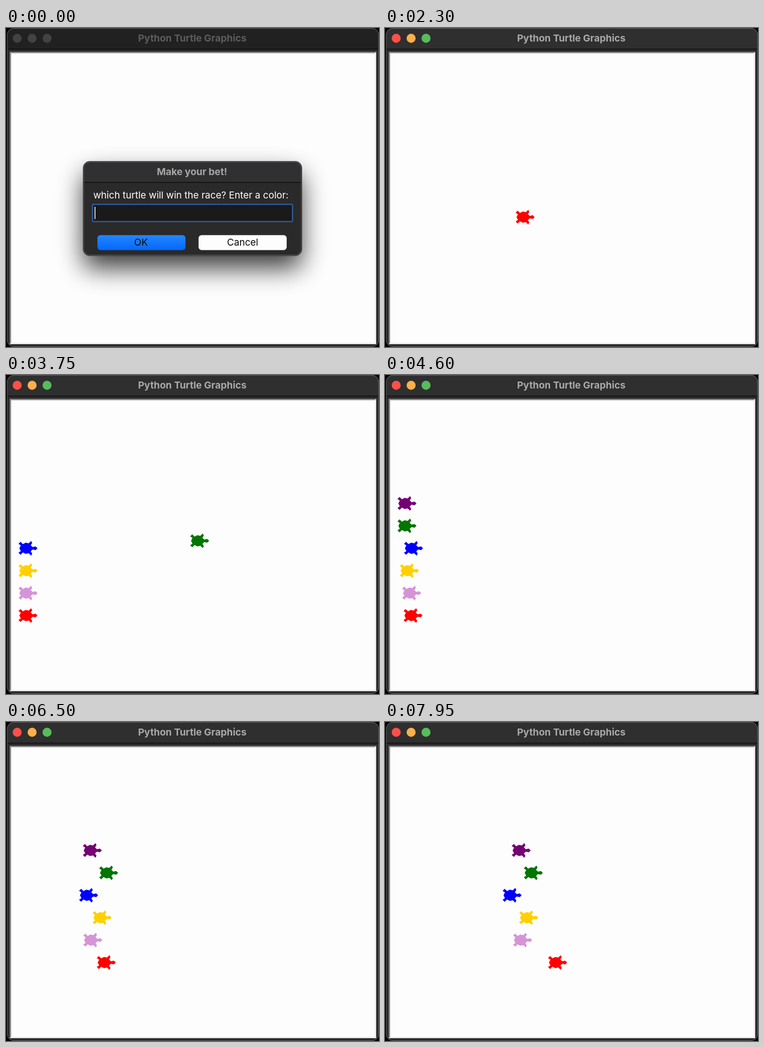
Write an HTML page that moves like this. It is 800 px wide and 683 px high and loops after 8000 ms.

```html
<!DOCTYPE html>
<html lang="en">
<head>
<meta charset="utf-8">
<title>Turtle race</title>
<style>
  html, body { margin: 0; width: 100%; height: 100%; overflow: hidden; background: #000; }
  svg { display: block; width: 100vw; height: 100vh; }
  text { font-family: Inter, "Open Sans", sans-serif; font-size: 20.4px; }
  .title { font-size: 20.7px; font-weight: 700; text-anchor: middle; }
  .mid { text-anchor: middle; }
</style>
</head>
<body>
<svg viewBox="0 0 800 683">
  <defs>
    <filter id="blur" x="-40%" y="-80%" width="180%" height="260%">
      <feGaussianBlur stdDeviation="27"/>
    </filter>
    <linearGradient id="ok" x2="0" y2="1">
      <stop stop-color="#2486ff"/>
      <stop offset="1" stop-color="#0568fb"/>
    </linearGradient>
    <clipPath id="frame"><rect x="2" width="798" height="683" rx="15"/></clipPath>
    <clipPath id="page"><rect x="11" y="54" width="780" height="620"/></clipPath>
  </defs>

  <g clip-path="url(#frame)">
    <rect width="800" height="683" fill="#2b2b2b"/>
    <rect id="bar" width="800" height="45"/>
    <rect y="44.5" width="800" height="1.5" fill="#0c0c0c"/>
  </g>
  <rect x="2.7" y=".7" width="796.6" height="681.6" rx="15" fill="none" stroke="#5c5c5c" stroke-width="1.2"/>
  <g id="lights"></g>
  <text id="heading" class="title" x="399.5" y="28.7">Python Turtle Graphics</text>

  <rect x="8" y="51" width="786" height="626" fill="#ececec"/>
  <path d="M8 677V51H794L791 54H11V674Z" fill="#8c8c8c"/>
  <rect x="11" y="54" width="780" height="620" fill="#fdfdfd"/>
  <g id="field" clip-path="url(#page)"></g>

  <g id="dialog">
    <g clip-path="url(#page)">
      <rect x="166" y="312" width="468" height="202" rx="15" opacity=".76" filter="url(#blur)"/>
    </g>
    <rect x="165" y="285" width="470" height="203" rx="15" fill="#111"/>
    <rect x="166.5" y="286.5" width="467" height="200" rx="14" fill="#2a2a2a"/>
    <path d="M166.5 330V300.5a14 14 0 0 1 14-14H619.5a14 14 0 0 1 14 14V330Z" fill="#303032"/>
    <rect x="166" y="329.8" width="468" height="1.4" fill="#080808"/>
    <rect x="166.5" y="286.5" width="467" height="200" rx="14" fill="none" stroke="#636363" stroke-width="1.3"/>
    <text class="title" x="399" y="314.5" fill="#a6a6a6">Make your bet!</text>
    <text class="mid" x="396.5" y="365" fill="#fff">which turtle will win the race? Enter a color:</text>
    <rect x="185.5" y="377.5" width="429" height="37" rx="2" fill="#1a1a1a" stroke="#2c558d" stroke-width="3"/>
    <text id="entry" x="191" y="403.5" fill="#fff"></text>
    <rect id="caret" y="383" width="1.7" height="26" fill="#fff"/>
    <rect x="196" y="443.5" width="189" height="32" rx="6.5" fill="url(#ok)"/>
    <text class="mid" x="289.5" y="466" fill="#0a0a0a">OK</text>
    <rect x="413" y="443.5" width="189" height="32" rx="6.5" fill="#fdfdfd"/>
    <text class="mid" x="507.5" y="466" fill="#0a0a0a">Cancel</text>
  </g>
</svg>
<script>
const LOOP = 8000, TICK = 50;
const CLOSE = 2100;
const WORD = "plum", KEYS = [850, 1050, 1250, 1500];
const UNIT = 1.6, HOME = { x: 409, y: 355 }, START_X = 40.8;
const SPAWN = 2134, TURN = 400, IDLE = 60, GLIDE = 340;
const RACE = 4540, ROUND = 100;

// Each track lists [time, distance run] marks along the race.
const racers = [
  { color: "#ff0000", track: [[4600, 13], [5450, 77], [6500, 168], [6800, 207], [7650, 305], [7950, 323]] },
  { color: "#d694d8", track: [[4600, 10], [5450, 58], [6500, 139], [7950, 248]] },
  { color: "#ffd000", track: [[4600, 5], [5450, 69], [6500, 159], [7950, 261]] },
  { color: "#0000ff", track: [[4600, 14], [5450, 72], [6500, 130], [7950, 225.5]] },
  { color: "#007500", track: [[4600, 0], [5450, 95], [5950, 139], [6500, 173], [7950, 271]] },
  { color: "#740074", track: [[4600, 0], [5450, 58], [6500, 138], [7950, 245]] },
];

const $ = id => document.getElementById(id);
const clamp = v => Math.min(1, Math.max(0, v));

function add(parent, tag, attrs) {
  const el = document.createElementNS("http://www.w3.org/2000/svg", tag);
  for (const k in attrs) el.setAttribute(k, attrs[k]);
  return parent.appendChild(el);
}

// Upper half of the shape, nose to tail; the lower half mirrors it.
const half = [[16, 0], [14, 2], [10, 1], [7, 4], [9, 7], [8, 9], [5, 6], [1, 7],
  [-3, 5], [-6, 8], [-8, 6], [-5, 4], [-7, 0]];
const outline = half.concat(half.slice(1, -1).reverse().map(([x, y]) => [x, -y])).join(" ");

const lights = ["#fe5049", "#fbb04b", "#57bd5b"].map((color, i) =>
  ({ color, el: add($("lights"), "circle", { cx: 24 + 32 * i, cy: 22, r: 9.7 }) }));

racers.forEach((r, i) => {
  r.y = HOME.y + UNIT * (100 - 30 * i);
  r.track.unshift([RACE - 1, 0]);
  r.el = add($("field"), "polygon", { points: outline, fill: r.color, stroke: r.color, "stroke-width": 1 });
});

const noise = (i, k) => {
  const v = Math.sin(i * 78.23 + k * 12.99 + 4) * 43758.55;
  return v - Math.floor(v);
};

// Number of jumps racer i has made by time t.
const jumps = (i, t) => Math.max(0, Math.floor((t - RACE - i * ROUND / 6) / ROUND) + 1);

function effort(i, from, to) {
  let sum = 0;
  for (let k = from; k < to; k++) sum += 0.4 + noise(i, k);
  return sum;
}

function distance(i, t) {
  const { track } = racers[i];
  if (t < track[0][0]) return 0;
  const n = track.findIndex(mark => mark[0] > t);
  if (n < 0) return track[track.length - 1][1];
  const [t0, d0] = track[n - 1], [t1, d1] = track[n];
  const first = jumps(i, t0);
  const total = effort(i, first, jumps(i, t1)) || 1;
  return d0 + (d1 - d0) * effort(i, first, jumps(i, t)) / total;
}

function drawRacer(r, i, t) {
  const born = SPAWN + i * TURN;
  const u = clamp((t - born - IDLE) / GLIDE);
  const x = HOME.x + (START_X - HOME.x) * u + distance(i, t);
  const y = HOME.y + (r.y - HOME.y) * u;
  r.el.setAttribute("transform", `translate(${x} ${y}) scale(${UNIT})`);
  r.el.setAttribute("visibility", t >= born ? "visible" : "hidden");
}

function drawDialog(t) {
  $("dialog").setAttribute("visibility", t < CLOSE ? "visible" : "hidden");
  const typed = KEYS.filter(k => k <= t).length;
  $("entry").textContent = WORD.slice(0, typed);
  $("caret").setAttribute("x", 190 + (typed ? $("entry").getComputedTextLength() + 1 : 0));
  const since = t - (typed ? KEYS[typed - 1] : 0);
  $("caret").setAttribute("opacity", since % 900 < 600 ? 1 : 0);
}

function draw(t) {
  const active = t >= CLOSE;
  $("bar").setAttribute("fill", active ? "#2f2f2f" : "#212121");
  $("heading").setAttribute("fill", active ? "#a9a9a9" : "#5c5c5c");
  lights.forEach(l => l.el.setAttribute("fill", active ? l.color : "#424242"));
  drawDialog(t);
  racers.forEach((r, i) => drawRacer(r, i, t));
}

function loop() {
  const t = performance.now() % LOOP;
  draw(Math.floor(t / TICK) * TICK);
  requestAnimationFrame(loop);
}
draw(0);
requestAnimationFrame(loop);
</script>
</body>
</html>
```
